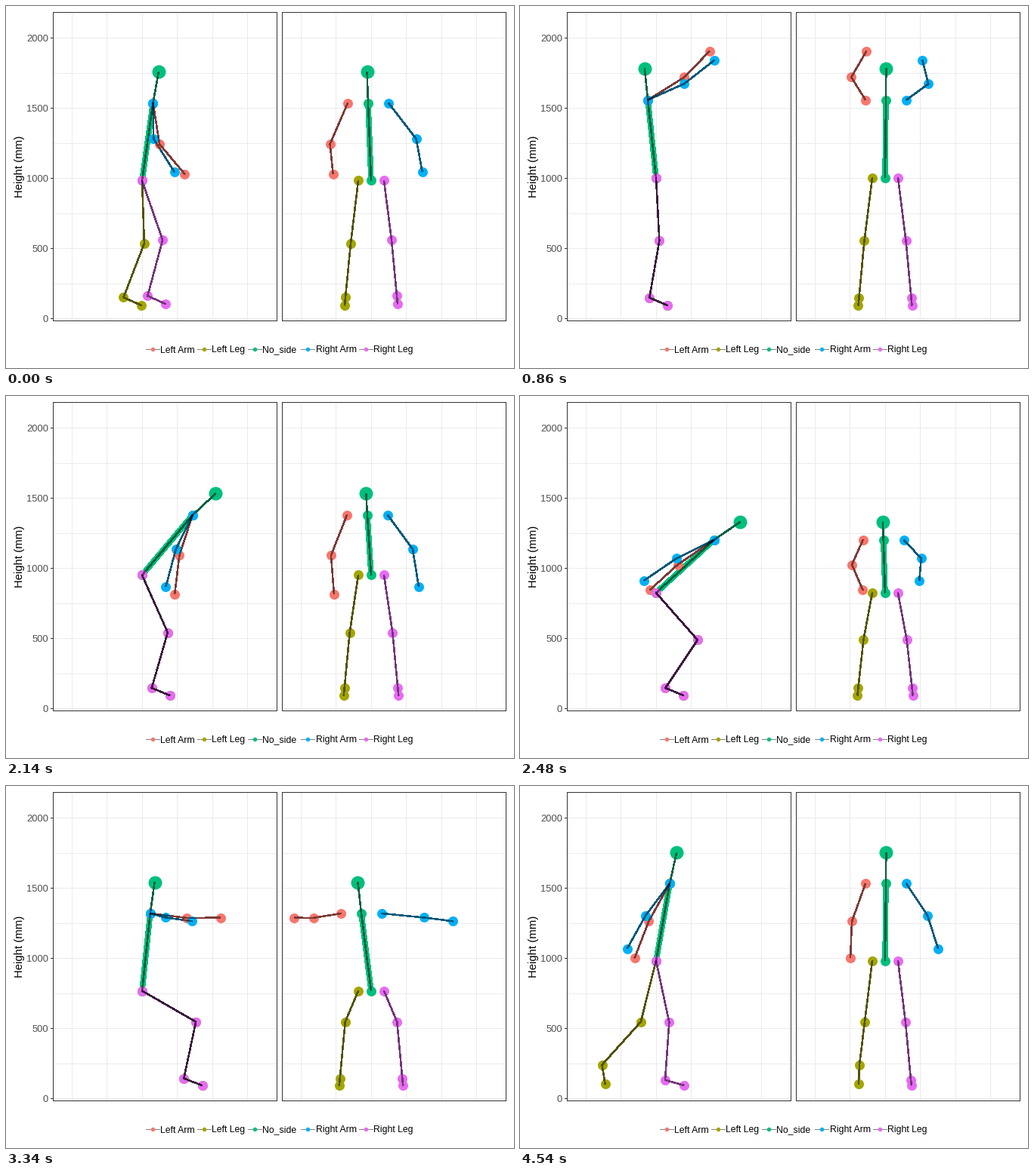
Write a matplotlib script that moves like this. It is 672 by 480 pixels and loops after 4.56 s.

```python
import numpy as np
import matplotlib.pyplot as plt
from matplotlib.animation import FuncAnimation
from matplotlib.patches import Rectangle

W, H, DPI = 672, 480, 96
FRAMES, STEP = 228, 20
PT = 72 / DPI  # points per pixel
SIDE_X, FRONT_X, FLOOR = 180, 483, 396

plt.rcParams["font.family"] = "Liberation Sans"

# Bone lengths in pixels
TORSO, NECK, UPPER_ARM, FOREARM = 104, 42, 60, 52
THIGH, SHANK, FOOT = 84, 77, 26
SHOULDER, HIP = 27, 17  # half widths
GRAVITY = 1822  # pixels per second squared
APEX_TIME, APEX_HIP = 3.01, 185

LEFT, RIGHT = -1, 1
time = np.arange(FRAMES) * STEP


def track(*keys):
    """Monotone cubic curve through (ms, value) keys, one value per frame."""
    x, v = np.array(keys, float).T
    h = np.diff(x)
    rate = np.diff(v) / h
    slope = np.concatenate([rate[:1], np.zeros(len(x) - 2), rate[-1:]])
    a, b = rate[:-1], rate[1:]
    same = a * b > 0
    slope[1:-1][same] = 2 * a[same] * b[same] / (a[same] + b[same])
    i = np.clip(np.searchsorted(x, time, "right") - 1, 0, len(h) - 1)
    u = (time - x[i]) / h[i]
    return (v[i] * (1 + 2 * u) * (1 - u) ** 2 + v[i + 1] * u * u * (3 - 2 * u)
            + h[i] * u * (1 - u) * (slope[i] * (1 - u) - slope[i + 1] * u))


def bone(start, length, angle, spread=0):
    """End of a bone; angle runs forward from straight down, spread sideways."""
    reach = np.sqrt(length ** 2 - spread ** 2)
    rad = np.radians(angle)
    step = [reach * np.sin(rad), reach * np.cos(rad), spread + 0 * rad]
    return start + np.stack(step, axis=-1)


# Torso: forward lean in degrees, sideways sway in pixels
lean = track((0, 8), (860, -6), (1500, -9), (2140, 40), (2450, 48), (2780, 19),
             (3000, 7), (3340, 6), (3800, 39), (3920, 37), (4240, 13), (4540, 10))
sway = track((0, -4), (860, 1), (2140, -5), (2780, 0), (3340, -13),
             (3920, -2), (4540, 1))

# Arms swing up, back, and forward through the jump
SWING = [(0, 5), (520, 2), (860, 118), (1400, 176), (1640, 180), (2140, -22),
         (2400, -80), (2600, 5), (2780, 113), (2880, 125), (3340, 79)]
ARM_END = [(4240, 5), (4540, -33)]
elbow_bend = track((0, 31), (520, 35), (860, 14), (1400, 40), (2140, 11),
                   (2780, 7), (4540, 8))
arm_spread = track((0, 30), (860, 24), (2140, 27), (2780, 12), (3340, 46),
                   (3920, 22), (4540, 23))
hand_spread = track((0, 2), (860, -14), (2140, 2), (2780, -17), (3340, 32),
                    (3920, 0), (4540, 8))

# Legs share the crouch, jump and landing; first and last steps differ
THIGH_JUMP = [(520, 3), (1400, 3), (2140, 24), (2450, 42), (2780, -2),
              (2840, -9), (3100, 58), (3340, 60), (3600, 78)]
SHANK_JUMP = [(520, -11), (1400, -9), (2140, -16), (2450, -32), (2780, -50),
              (2960, -46), (3200, 8), (3340, -12), (3600, -42)]
FOOT_JUMP = [(0, 66), (2600, 68), (2780, 24), (2860, 10), (3240, 55), (3340, 69)]
leg_spread = track((0, 10), (2780, 12), (3500, 18), (4540, 10))


def chain(*joints):
    return np.stack(joints, axis=1)


def arm(side, swing):
    """Shoulder, elbow, hand."""
    upper = swing + side * -4
    shoulder = neck + [0, 0, side * SHOULDER]
    elbow = bone(shoulder, UPPER_ARM, upper,
                 side * arm_spread * (1 + 0.22 * side))
    hand = bone(elbow, FOREARM, upper + elbow_bend,
                side * hand_spread + 6)
    return chain(shoulder, elbow, hand)


def leg(side, thigh, shank, foot):
    """Hip, knee, ankle, toe."""
    hip = pelvis + [0, 0, side * HIP]
    knee = bone(hip, THIGH, thigh, side * leg_spread)
    ankle = bone(knee, SHANK, shank, side * 7)
    return chain(hip, knee, ankle, bone(ankle, FOOT, foot, side))


pelvis = np.zeros((FRAMES, 3))
neck = bone(pelvis, TORSO, 180 - lean, sway)
head = bone(neck, NECK, 179 - 1.15 * lean, 0.35 * sway)

body = {
    "Left Arm": arm(LEFT, track(*SWING, (3920, 65), *ARM_END)),
    "Left Leg": leg(LEFT,
                    track((0, 2), *THIGH_JUMP, (3920, 64), (4240, 14), (4540, -14)),
                    track((0, -21), *SHANK_JUMP, (3920, -36), (4240, -18), (4540, -42)),
                    track(*FOOT_JUMP, (4200, 69), (4540, 9))),
    "No_side": chain(head, neck, pelvis),
    "Right Arm": arm(RIGHT, track(*SWING, (3920, -41), *ARM_END)),
    "Right Leg": leg(RIGHT,
                     track((0, 19), *THIGH_JUMP, (3920, 48), (4240, 14), (4540, 12)),
                     track((0, -15), *SHANK_JUMP, (3920, -57), (4240, -18), (4540, -4)),
                     track(*FOOT_JUMP, (3920, 48), (4240, 70), (4540, 74))),
}

# The lower foot rests on the floor unless the body is in free flight
drop = np.maximum(body["Left Leg"][..., 1].max(1), body["Right Leg"][..., 1].max(1))
flight = APEX_HIP + GRAVITY / 2 * (time / 1000 - APEX_TIME) ** 2
hip_y = np.minimum(FLOOR - drop, flight)
for limb in body.values():
    limb[..., 1] += hip_y[:, None]

fig = plt.figure(figsize=(W / DPI, H / DPI), dpi=DPI, facecolor="white")
ax = fig.add_axes([0, 0, 1, 1])
ax.set(xlim=(0, W), ylim=(H - 1, -1))  # whole numbers snap to whole pixels
ax.axis("off")


def line(xs, ys, color, width=1, z=1, **kw):
    return ax.plot(xs, ys, color=color, lw=width * PT, zorder=z,
                   antialiased=False, **kw)[0]


def dots(color, size, z, xs=(), ys=()):
    return ax.plot(xs, ys, "o", color=color, ms=size * PT, mew=0, zorder=z,
                   antialiased=False)[0]


def label(x, y, s, size, color="black", **kw):
    ax.text(x, y, s, fontsize=size * PT, color=color, **kw)


TOP, BOTTOM, PANEL_W, GRID = 7, 416, 296, 46.5

for left in (62, 365):
    for k in range(9):
        y = int(41.5 + k * GRID)
        line([left, left + PANEL_W], [y, y], "#EBEBEB")
    for k in range(6):
        x = left + int(25 + k * GRID)
        line([x, x], [TOP, BOTTOM], "#EBEBEB")
    ax.add_patch(Rectangle((left, TOP), PANEL_W, BOTTOM - TOP, fill=False,
                           ec="#333333", lw=PT, zorder=20, antialiased=False))

for k in range(5):
    y = int(41.5 + 2 * k * GRID)
    line([59, 62], [y, y], "#333333")
    label(56, y + 5, str(2000 - 500 * k), 12.9, "#4D4D4D", ha="right",
          va="baseline")
label(18.5, 212, "Height (mm)", 14.9, rotation=90, ha="center", va="center")

COLORS = ["#F8766D", "#A3A500", "#00BF7D", "#00B0F6", "#E76BF3"]
KEY_X = [194, 262, 329, 399, 476]
GREEN = COLORS[2]

for name, color, x in zip(body, COLORS, KEY_X):
    line([x - 9, x + 9], [454, 454], "#808080")
    dots(color, 5.5, 2, [x], [454])
    label(x + 10.5, 458.5, name, 12.2, va="baseline")


class Figure:
    """Stick figure in one panel, drawn along one horizontal axis."""

    def __init__(self, axis, origin):
        self.axis, self.origin = axis, origin
        self.torso = line([], [], GREEN, 6.5, 3, solid_capstyle="butt")
        self.head = dots(GREEN, 18, 7)
        self.limbs = {}
        for z, (name, color) in enumerate(zip(body, COLORS), 5):
            self.limbs[name] = [
                line([], [], color, 1.5, 4),
                dots(color, 13, z),
                line([], [], "black", 1.5, 12, alpha=0.5, solid_capstyle="butt"),
            ]

    def points(self, name, i):
        joints = body[name][i]
        return self.origin + joints[:, self.axis], joints[:, 1]

    def move(self, i):
        x, y = self.points("No_side", i)
        self.torso.set_data(x[1:], y[1:])
        self.head.set_data(x[:1], y[:1])
        for name, artists in self.limbs.items():
            for artist in artists:
                artist.set_data(*self.points(name, i))


views = [Figure(0, SIDE_X), Figure(2, FRONT_X)]


def draw(i):
    for view in views:
        view.move(i)
    return []


anim = FuncAnimation(fig, draw, frames=FRAMES, interval=STEP, repeat=True,
                     repeat_delay=0)
plt.show()
```
